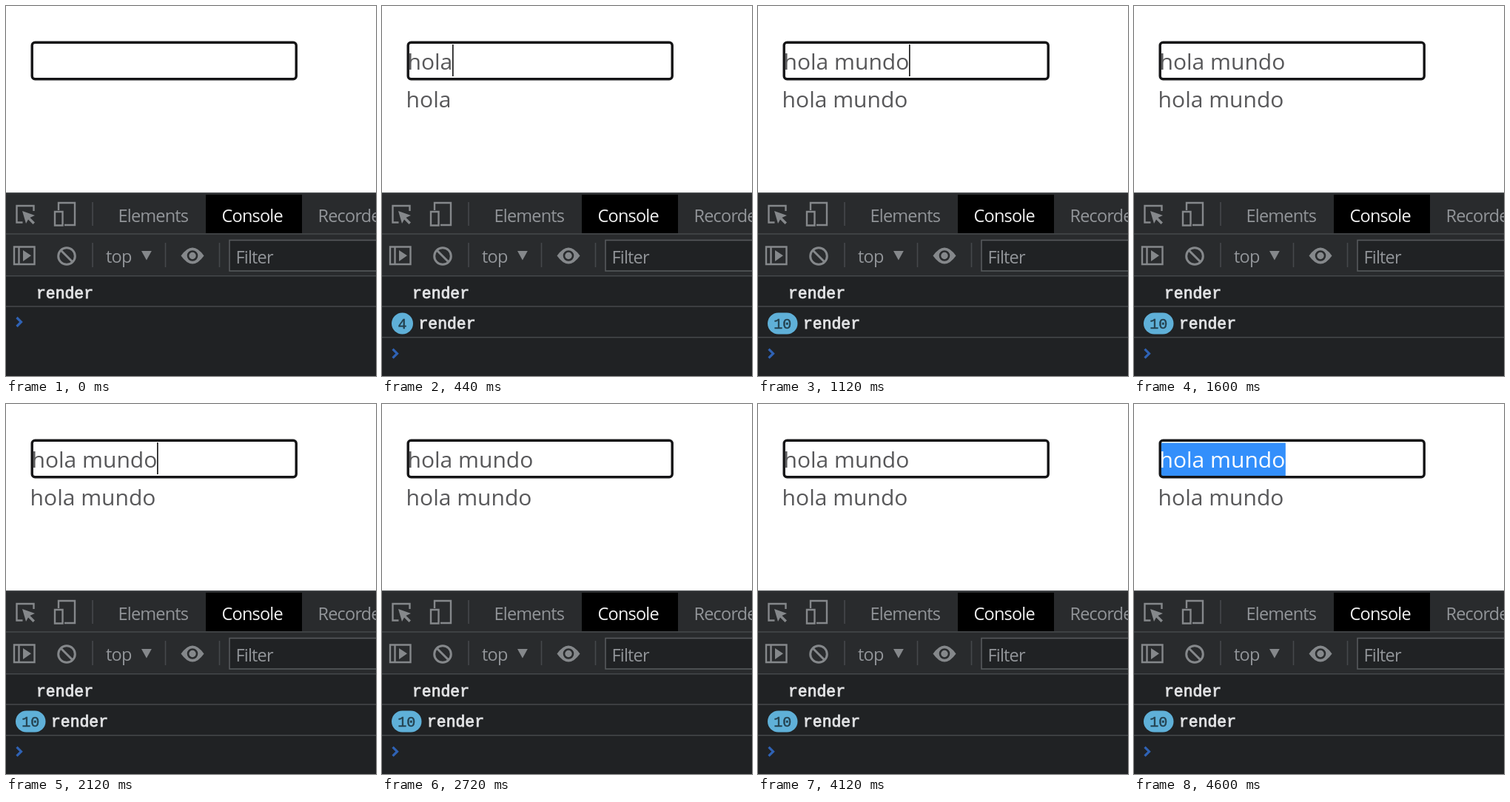
An HTML page that plays this animation: 500x500 px, repeating every 4640 ms.

```html
<!DOCTYPE html>
<html lang="es">
<head>
<meta charset="utf-8">
<title>Render console</title>
<style>
  html, body { margin: 0; width: 100%; height: 100%; overflow: hidden; background: #fff; }
  svg { display: block; width: 100vw; height: 100vh; }
  text { white-space: pre; }
  .page { font: 30px "Open Sans", sans-serif; fill: #58585a; }
  .page.selected { fill: #fff; }
  .ui { font: 500 23.5px "Open Sans", sans-serif; letter-spacing: -.8px; fill: #929599; }
  .ui.active { fill: #f1f1f1; }
  .log { font: 21.4px "Liberation Mono", monospace; fill: #e2e3e5; stroke: #e2e3e5; stroke-width: .9; }
  .badge { font: 20px "Liberation Mono", monospace; fill: #24404e; stroke: #24404e; stroke-width: .5; text-anchor: middle; }
  .rule { stroke: #45484b; stroke-width: 1.6; fill: none; }
  .icon { stroke: #85888b; stroke-width: 2.4; fill: none; }
  .solid { fill: #85888b; }
</style>
</head>
<body>
<svg viewBox="0 0 500 500">
  <rect width="500" height="500" fill="#fff"/>

  <rect id="selection" x="36" y="52.5" height="44.5" fill="#338ffb"/>
  <text id="field" class="page" x="34.5" y="85.7"></text>
  <rect id="caret" y="52" width="1.6" height="43" fill="#111"/>
  <rect x="35.2" y="49.2" width="357" height="49.6" rx="4" fill="none" stroke="#141416" stroke-width="3.4"/>
  <text id="echo" class="page" x="32.6" y="136.7"></text>

  <rect y="252" width="500" height="248" fill="#202224"/>
  <rect y="252" width="500" height="113" fill="#292b2d"/>
  <rect x="270" y="255" width="130" height="52" fill="#000"/>
  <path class="rule" d="M0 252.8H500M0 308H500M0 364.8H500M0 406H500M117 265V297M117 320V353M215.5 320V353M288.5 320V353"/>

  <path class="icon" d="M22.5 292.5H14.5V270H37.5V277"/>
  <path class="solid" d="M22 277L39 283L32.5 286L39 292.5L36.5 295L30 288.5L27 294Z"/>
  <path class="icon" d="M71 276V266H93V296H79M66 278H76.5V296.5H66Z"/>
  <text class="ui" x="151.5" y="291.5">Elements</text>
  <text class="ui active" x="291.5" y="291.5">Console</text>
  <text class="ui" x="421.5" y="291.5">Recorder</text>

  <path class="icon" d="M11 325.5H38.5V349H11ZM17.5 325V349"/>
  <path class="solid" d="M23 330L34 337.3L23 345Z"/>
  <circle class="icon" cx="82" cy="338" r="11.3" style="stroke-width:3"/>
  <path class="icon" d="M74 330L90 346" style="stroke-width:3"/>
  <text class="ui" x="135" y="346.7">top</text>
  <path class="solid" d="M183 331H196.8L189.9 343.5Z"/>
  <path class="solid" d="M236.5 337.5Q252 315.5 267.5 337.5Q252 359.5 236.5 337.5Z"/>
  <circle cx="252" cy="337.5" r="6" fill="#85888b" stroke="#292b2d" stroke-width="2.6"/>
  <rect x="302" y="316.5" width="210" height="41.5" fill="#202224" stroke="#56595c" stroke-width="1.6"/>
  <text class="ui" x="310.5" y="348.3">Filter</text>

  <text class="log" x="41" y="394.7">render</text>
  <g id="repeat">
    <path class="rule" d="M0 447.8H500"/>
    <g id="count">
      <rect id="pill" x="13" y="414.5" height="29" rx="14.5" fill="#5fb0d8"/>
      <text id="number" class="badge" y="436"></text>
    </g>
    <text id="label" class="log" y="435.7">render</text>
  </g>
  <path id="prompt" d="M14.5 -6L20.5 0L14.5 6" fill="none" stroke="#2f62b4" stroke-width="3.2"/>
</svg>
<script>
  const LOOP = 4640, PHRASE = "hola mundo";
  const FIRST_KEY = 80, LAST_KEY = 1040, SELECT_AT = 4400, BLINK = 530;
  const KEY_GAP = (LAST_KEY - FIRST_KEY) / (PHRASE.length - 1);
  const $ = id => document.getElementById(id);
  const show = (id, on) => $(id).setAttribute("visibility", on ? "inherit" : "hidden");
  const set = (id, attrs) => {
    for (const name in attrs) $(id).setAttribute(name, attrs[name]);
  };

  function draw(t) {
    const typed = t < FIRST_KEY ? 0
      : Math.min(PHRASE.length, Math.floor((t - FIRST_KEY) / KEY_GAP + 1e-6) + 1);
    const text = PHRASE.slice(0, typed);
    const selected = t >= SELECT_AT;
    const caretOn = t < LAST_KEY || Math.floor((t - LAST_KEY) / BLINK) % 2 === 0;

    $("field").textContent = $("echo").textContent = text;
    $("field").classList.toggle("selected", selected);
    const end = 34.5 + (typed ? $("field").getComputedTextLength() : 0);
    set("caret", { x: end - .3 });
    show("caret", typed > 0 && caretOn && !selected);
    set("selection", { width: Math.max(0, end - 35.5) });
    show("selection", selected);

    const pill = typed > 9 ? 40.5 : 29;
    show("repeat", typed > 0);
    show("count", typed > 1);
    set("pill", { width: pill });
    set("number", { x: 13 + pill / 2 });
    $("number").textContent = typed;
    set("label", { x: typed > 1 ? pill + 20.5 : 41 });
    set("prompt", { transform: `translate(0 ${typed ? 469.7 : 427})` });
  }

  const start = performance.now();
  function tick() {
    draw((performance.now() - start) % LOOP);
    requestAnimationFrame(tick);
  }
  tick();
</script>
</body>
</html>
```
